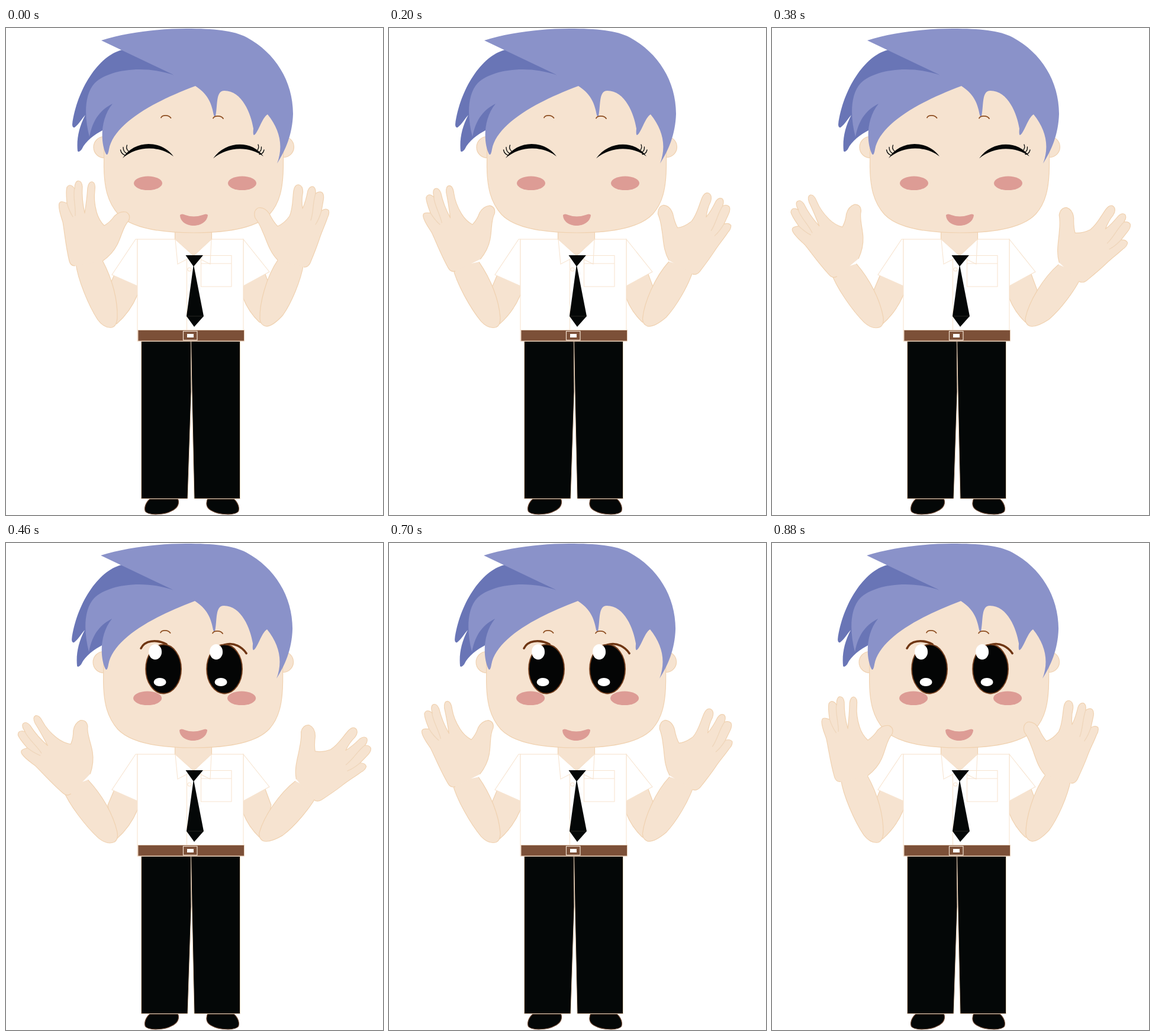
Animation of 637x823 px, one loop 0.9 s. Source, as an HTML page:

```html
<!DOCTYPE html>
<html lang="en">
<head>
<meta charset="utf-8">
<title>Waving boy</title>
<style>
  html, body { margin: 0; width: 100%; height: 100%; overflow: hidden; background: #fff; }
  svg { display: block; width: 100%; height: 100%; }
  .skin { fill: #f6e3d0; stroke: #f0d2b1; stroke-width: 1.2; stroke-linejoin: round; }
  .crease { fill: none; stroke: #efd6bb; stroke-width: 1.3; stroke-linecap: round; }
  .cloth { fill: #fff; stroke: #f7e4d0; stroke-width: 1.1; }
  .seam { fill: none; stroke: #f7e4d0; stroke-width: 1.1; }
  .black { fill: #040707; }
  .hair { fill: #8a92c9; }
  .shade { fill: #6975b6; }
  .pink { fill: #dd9c95; }
  .lash { fill: none; stroke: #040707; stroke-width: 1.3; stroke-linecap: round; }
  .brow { fill: none; stroke: #8e4f22; stroke-width: 1.8; stroke-linecap: round; }
  .lid { fill: none; stroke: #6f3613; stroke-width: 3.6; stroke-linecap: round; }
  .iris { fill: #040505; stroke: #75401f; stroke-width: 1.8; }
</style>
</head>
<body>
<svg viewBox="0 0 637 823" preserveAspectRatio="none">
  <!-- legs -->
  <g stroke="#6b4631" stroke-width="1.2" class="black">
    <path d="M243 796C236 802 233 811 235.500 817C241 824 268 823 280 816C291 811 293 803 290.500 796Z"/>
    <path d="M385 796C392 802 395 811 392.500 817C387 824 360 823 348 816C337 811 338 803 340.500 796Z"/>
  </g>
  <g stroke="#f1d5ba" stroke-width="1" class="black">
    <path d="M228.500 529.500H312.500L313 615L307 795.500H228.500Z"/>
    <path d="M312.500 529.500H395.500V795.500H318L314 612Z"/>
  </g>

  <!-- upper arms -->
  <path class="skin" d="M183 417L172 443L180 500L187 500Q210 480 222.500 450V434Z"/>
  <path class="skin" d="M438 416L448 443L436 500L428 497Q410 480 401 457V434Z"/>

  <!-- shirt -->
  <path class="cloth" d="M222 357H219L179 417L222 436Z"/>
  <path class="cloth" d="M401 357L445 412L401 436Z"/>
  <rect class="cloth" x="222" y="357" width="179" height="172"/>
  <path class="skin" stroke="none" d="M285.500 340H347.500V357L317 385L285.500 357Z"/>
  <path class="cloth" d="M286 357L290 399L317 385Z"/>
  <path class="cloth" d="M347 357L345 399L317 385Z"/>
  <path class="seam" d="M305.500 391V511M329.500 384.500H381V437H329.500ZM329.500 398H381"/>
  <circle class="seam" cx="310" cy="408" r="3"/>
  <path class="black" d="M303.500 384H333L317.500 402.500L334 487L318 505L305 487L316.500 402.500Z"/>
  <path d="M305 487H334" stroke="#34302c" stroke-width=".8"/>
  <rect x="223" y="510.500" width="179.500" height="18.500" fill="#7c5038" stroke="#ead2bd"/>
  <rect x="299.500" y="512.500" width="23.500" height="15" fill="#7c5038" stroke="#f3e1d0" stroke-width="1.2"/>
  <rect x="306" y="517" width="11" height="6" fill="#fff"/>

  <!-- head -->
  <g id="head">
    <circle class="skin" cx="166" cy="201.500" r="18"/>
    <circle class="skin" cx="469" cy="201" r="17.500"/>
    <path class="skin" d="M166 120L165.500 235C166 270 172 295 190 315C212 338 262 346 317 346C372 346 424 338 446 314C462 296 468 272 468.500 235L469 120L430 80H220Z"/>
    <path class="shade" d="M196 37C156 47 120 104 112 163Q112 169 116 168C124 162 128 153 134 147C123 168 119 188 121 208Q123 211 128 205C135 190 150 180 163 173L185 125L285 80L230 45Z"/>
    <path class="hair" d="M161 21C205 7 262 1 305 1C350 1 385 4 407 16C455 42 485 90 485 145C484 180 472 207 458 229C469 200 463 172 442 146C432 152 426 178 419 181Q417 181 418 170C414 145 399 106 369 106C354 106 358 130 354 149Q353 152 351 147C347 125 340 111 320 98C245 126 182 163 174 205Q172 217 169 213C160 195 158 155 180 128C162 137 147 152 141 184C132 150 132 112 150 93C172 71 232 61 285 80Z"/>
    <path class="brow" d="M262 151.500C264 146.500 275 146.500 278.500 152M350 152.500C352 147.500 364 147.500 367 153"/>
    <ellipse class="pink" cx="240" cy="262.300" rx="24" ry="11.800"/>
    <ellipse class="pink" cx="399" cy="262.300" rx="24" ry="11.800"/>
    <path class="pink" d="M294 316Q297 313 303 316Q317 321 332 316Q339 313 341 316C340 328 328 334 317 334C305 334 294 327 294 316Z"/>
    <g id="shut">
      <path class="black" d="M197 220C216 189 262 188 283 217C260 199 222 198 197 220Z"/>
      <path class="black" d="M350 220.500C371 190 416 189 435 217C412 200 376 199 350 220.500Z"/>
      <path class="lash" d="M193.500 206Q195 213 201 215M198 201.500Q198 209 204 212M204.500 198Q202 204 207 208"/>
      <path class="lash" d="M436 206Q434.500 213 428 213.500M431.500 201Q432 208 427 210M426 197Q428 202 425 206"/>
    </g>
    <g id="open">
      <path class="lid" d="M229 178C235 165 254 162 272 171M370 172C386 167 400 176 407 186.500"/>
      <g id="eye">
        <ellipse class="iris" cx="267" cy="213" rx="30" ry="41.500"/>
        <ellipse cx="253" cy="184" rx="11" ry="13" fill="#fff"/>
        <ellipse cx="261" cy="235" rx="10.500" ry="7" fill="#fff"/>
      </g>
      <use href="#eye" x="103"/>
    </g>
  </g>

  <!-- left forearm and hand -->
  <path id="armL" class="skin" d="M118 397C121 425 140 470 155 493Q166 508 179 506Q187 504 188 490C189 460 180 425 163 393"/>
  <g id="handL">
    <path class="skin" d="M117 402Q109 402 107 394C101 370 99 345 96 328C93 318 89 308 89.500 299Q90 292 97 294L103 296C102 285 101 276 103 269Q107 263 113 268L116 272C116 262 119 258 123 258.500Q128 259 129 268C128 285 130 300 133 313C135 300 137 285 138 270Q140 259 146 260Q152 262 150 275C148 290 150 300 153 311C156 322 160 328 166 334Q176 328 183 318Q192 309 203 311Q212 316 207 326C198 335 196 350 188 366Q180 382 163 394"/>
    <path class="crease" d="M103 296Q107 310 113 319M115.500 272C113 286 118 302 117 317"/>
  </g>

  <!-- right forearm and hand -->
  <path id="armR" class="skin" d="M503 398C498 428 482 465 468 485Q450 505 439 504Q430 502 429 492C428 465 440 420 460 391"/>
  <g id="handR">
    <path class="skin" d="M459 392C445 378 441 360 434 345Q428 330 421 321Q417 309 426 304Q437 302 445 314Q452 328 459 335C466 332 474 325 479 318C485 305 484 290 486 275Q488 264 495 265Q502 267 501.500 278C499 290 500 298 501 305C506 295 508 285 510 275Q513 267 519 268Q524 271 523 280Q529 275 534 278Q538 282 536 292L533 309Q540 304 545 308Q547 314 543 321C539 333 533 345 529 358C524 373 519 385 514 397Q510 405 503 404"/>
    <path class="crease" d="M523 280C518 296 520 310 515 325M533 309Q529 323 523 332"/>
  </g>
</svg>
<script>
  const $ = id => document.getElementById(id);
  const LOOP = 900, STEP = 20, TURN = 460, BACK = 452;

  // part, degrees at full swing, pivot
  const joints = [
    ['armL', -15, 178, 490],
    ['handL', -36, 147, 424],
    ['armR', 18, 439, 488],
    ['handR', 34, 463, 447]
  ];

  function draw(time) {
    const t = Math.floor((time % LOOP) / STEP) * STEP;
    const swing = t < TURN ? t / TURN : 1 - (t - TURN) / BACK;
    const awake = t >= TURN;
    for (const [id, deg, x, y] of joints) {
      $(id).setAttribute('transform', `rotate(${deg * swing} ${x} ${y})`);
    }
    $('shut').style.display = awake ? 'none' : '';
    $('open').style.display = awake ? '' : 'none';
    $('head').setAttribute('transform', `translate(${awake ? -0.9 : 0} 0)`);
  }

  let start;
  function tick(now) {
    start ??= now;
    draw(now - start);
    requestAnimationFrame(tick);
  }
  draw(0);
  requestAnimationFrame(tick);
</script>
</body>
</html>
```
